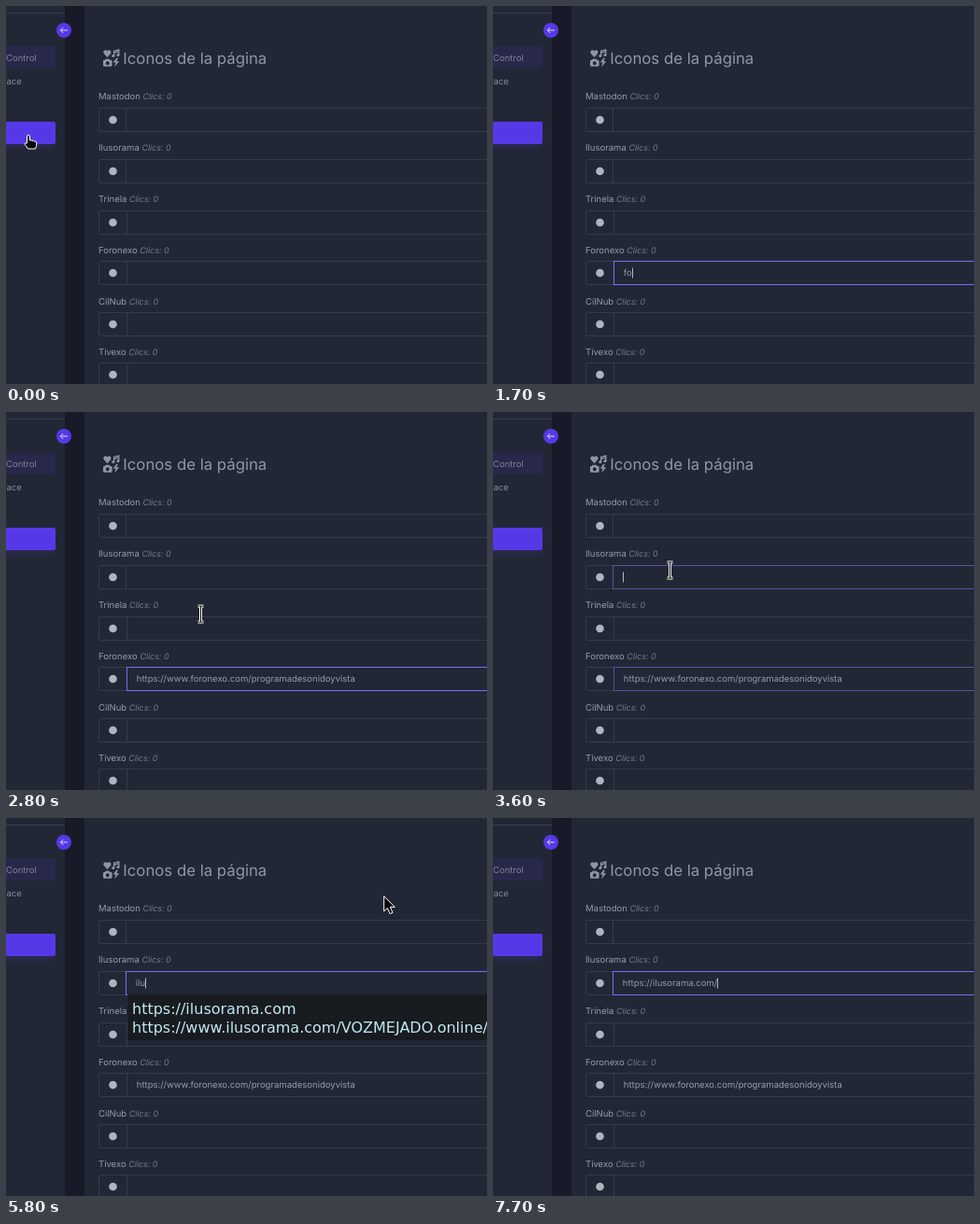
Write an HTML page that moves like this. It is 515 px wide and 405 px high and loops after 8000 ms.

```html
<!DOCTYPE html>
<html lang="es">
<head>
<meta charset="utf-8">
<title>Iconos de la página</title>
<style>
  html, body { margin: 0; width: 100%; height: 100%; overflow: hidden; background: #222736; }
  svg { display: block; }
  text { font: 9.5px Inter, sans-serif; fill: #979baa; white-space: pre; text-rendering: geometricPrecision; }
  .clicks { font-size: 8.9px; font-style: italic; fill: #767b8b; }
  .title { font-size: 16.75px; fill: #9195a4; }
  .popup text { font: 16px "DejaVu Sans", sans-serif; fill: #c3e7f3; text-rendering: auto; }
  .box { fill: none; stroke: #363b4b; }
  .focus { fill: none; stroke: #7b6cf0; }
</style>
</head>
<body>
<svg id="stage" width="515" height="405" viewBox="0 0 515 405">
  <defs>
    <filter id="glow" x="-20%" y="-50%" width="140%" height="220%"><feGaussianBlur stdDeviation="3"/></filter>
  </defs>
  <rect width="515" height="405" fill="#222736"/>
  <rect x="63" width="21" height="405" fill="#181a28"/>
  <path d="M0 7.5H63" stroke="#393e4e"/>
  <path d="M0 43H51a2 2 0 0 1 2 2V65a2 2 0 0 1-2 2H0Z" fill="#28284a"/>
  <text x="0" y="59" style="fill:#7e8295">Control</text>
  <text x="0.5" y="84" style="fill:#858a99">ace</text>
  <rect x="-10" y="127" width="61" height="24" fill="#5538df" opacity=".2" filter="url(#glow)"/>
  <path d="M0 124H51a2 2 0 0 1 2 2V146a2 2 0 0 1-2 2H0Z" fill="#5639e6"/>
  <circle cx="62" cy="26" r="8" fill="#5639e6"/>
  <path d="M66 26H58.5M61.3 23L58.3 26L61.3 29" fill="none" stroke="#dcd8fa"/>

  <g transform="translate(104 46.5) scale(1.03 1.05)" fill="#9195a4">
    <path d="M4.3 8L.8 4.4C-.6 2.4 1.8-.8 4.3 1.6C6.8-.8 9.2 2.4 7.8 4.4Z"/>
    <path d="M11.3 6.5V1.6L16.3.3V5.6M11.3 3.4L16.3 2.1" fill="none" stroke="#9195a4" stroke-width="1.3"/>
    <circle cx="10.5" cy="6.7" r="1.5"/><circle cx="15.5" cy="5.7" r="1.5"/>
    <path fill-rule="evenodd" d="M2.5 9.7H6.5L7.2 11H8.3Q9.3 11 9.3 12V16.3Q9.3 17.3 8.3 17.3H1Q0 17.3 0 16.3V12Q0 11 1 11H1.8ZM4.6 12.2a1.9 1.9 0 1 0 .1 0Z"/>
    <path d="M13.8 8.7L10.4 13.4H13L11.8 17.8L16.8 12.2H13.9L15.5 8.7Z"/>
  </g>
  <text class="title" x="125.3" y="62">Iconos de la página</text>
  <g id="fields"></g>
  <g id="popups"></g>
  <g id="mouse" stroke-linejoin="round">
    <path id="arrow" d="M.7.8V16.9L4.4 13.5L7.1 19.6L10 18.4L7.4 12.4H12.3Z" fill="#080808" stroke="#fff"/>
    <g id="beam" fill="none">
      <path d="M-3-8.5H3M0-8.5V8.5M-3 8.5H3" stroke="#fff" stroke-width="3"/>
      <path d="M-3-8.5H3M0-8.5V8.5M-3 8.5H3" stroke="#080808"/>
    </g>
    <path id="hand" d="M-1.5 9V1Q0-1 1.5 1V6Q3 5 4 6.5Q5.5 5.5 6.5 7Q8.5 6.5 8.7 8.5V11.5L7.5 15H-.5L-3.7 10.5Q-4.3 8 -1.5 9Z" fill="#080808" stroke="#fff"/>
  </g>
</svg>
<script>
const $ = id => document.getElementById(id);
const LOOP = 8000, STEP = 100;
const photo = 'https://ilusorama.com';
const forum = 'https://www.foronexo.com/programadesonidoyvista';
const names = ['Mastodon', 'Ilusorama', 'Trinela', 'Foronexo', 'CilNub', 'Tivexo'];

$('fields').innerHTML = names.map((name, i) => {
  const top = Math.round(i * 54.65 + .21) + 109.5, x = i < 2 ? 128.5 : 129.5;
  return `<text x="99" y="${100.3 + i * 54.8}">${name} <tspan class="clicks">Clics: 0</tspan></text>
    <path class="box" d="M520 ${top}H101.5q-2 0-2 2v21q0 2 2 2H520M${x} ${top}v25"/>
    <circle cx="114.5" cy="${top + 12.5}" r="4.3" fill="#b1b4c0"/>
    <rect class="focus" id="focus${i}" x="${x}" y="${top}" width="400" height="25"/>
    <text id="value${i}" x="${x + 10.3}" y="${top + 15.8}"></text>
    <rect id="caret${i}" y="${top + 7}" width="1" height="11" fill="#b4b7c3"/>`;
}).join('');

// a suggestion list hides the lower border of its field
const popup = (id, top, rows) => `<g class="popup" id="${id}">
  <rect x="130.5" y="${top}" width="390" height="${rows.length * 20 + 9}" fill="#181c20"/>
  <rect id="${id}Hover" x="130.5" y="${top + 5}" width="390" height="20" fill="#343b41"/>
  ${rows.map((row, i) => `<text x="135" y="${top + 21 + i * 20}">${row}</text>`).join('')}</g>`;
$('popups').innerHTML =
  popup('photoList', 189, [photo, 'https://www.ilusorama.com/VOZMEJADO.online/']) +
  popup('forumList', 298, [forum]);

// time, x, y, pointer shape
const path = [
  [0, 24, 138, 'hand'], [200, 60, 150, 'arrow'], [500, 180, 225, 'beam'],
  [900, 342, 295, 'beam'], [1000, 336, 290, 'beam'], [1300, 310, 287, 'beam'],
  [1500, 310, 287, ''], [2000, 215, 291.5, 'beam'], [2100, 215, 303, 'arrow'],
  [2200, 214, 313, 'arrow'], [2400, 214, 313, 'arrow'], [2500, 213, 290, 'beam'],
  [2800, 208.5, 216.5, 'beam'], [3000, 202, 150, 'beam'], [3100, 196, 128, 'beam'],
  [3200, 190, 127, 'arrow'], [3300, 189, 150, 'beam'], [3400, 189.5, 169.5, 'beam'],
  [4000, 189.5, 169.5, 'beam'], [4100, 188.5, 170.5, 'beam'], [4700, 188.5, 170.5, ''],
  [5200, 272.5, 63.5, 'beam'], [5300, 272.5, 63.5, ''], [5600, 352, 21, 'arrow'],
  [5800, 404, 83, 'arrow'], [6000, 396, 140, 'arrow'], [6200, 345, 200, 'arrow'],
  [6300, 338, 209, 'arrow'], [6400, 338, 206, 'arrow'], [7700, 338, 206, '']
];

const latest = (t, steps) => steps.reduce((now, [at, v]) => t >= at ? v : now, '');
const within = (t, a, b) => t >= a && t < b;
const show = (id, on) => $(id).setAttribute('visibility', on ? 'inherit' : 'hidden');

function pointer(t) {
  const n = path.findLastIndex(k => k[0] <= t), a = path[n], b = path[n + 1] || a;
  const p = b === a ? 0 : (t - a[0]) / (b[0] - a[0]);
  return { x: a[1] + (b[1] - a[1]) * p, y: a[2] + (b[2] - a[2]) * p, shape: a[3] };
}

// focus fades in and out over two steps
const fade = (t, a, b) => Math.max(0, t < a ? 0 : Math.min(1, (t - a + 100) / 200, (b + 100 - t) / 200));

function setField(i, value, focus, caret) {
  const text = $('value' + i);
  if (text.textContent !== value) text.textContent = value;
  $('focus' + i).setAttribute('opacity', focus);
  const end = +text.getAttribute('x') + (value ? text.getComputedTextLength() : 0);
  $('caret' + i).setAttribute('x', Math.round(end));
  show('caret' + i, caret);
}

function draw(now) {
  const t = Math.floor(Math.max(0, now - start) % LOOP / STEP) * STEP;
  const m = pointer(t);

  setField(3, latest(t, [[1600, 'f'], [1700, 'fo'], [2400, forum]]),
    fade(t, 1300, 3600),
    within(t, 1300, 2700) || within(t, 3200, 3600));
  setField(1, latest(t, [[4700, 'i'], [4800, 'il'], [4900, 'ilu'], [6500, photo], [7700, photo + '/']]),
    fade(t, 3600, LOOP + 200),
    within(t, 3600, 6200) || within(t, 6500, 7200) || t >= 7700);

  show('forumList', within(t, 1800, 2400));
  show('forumListHover', within(t, 2100, 2400));
  show('photoList', within(t, 4900, 6500));
  show('photoListHover', within(t, 6200, 6500));

  for (const shape of ['arrow', 'beam', 'hand']) show(shape, shape === m.shape);
  $('mouse').setAttribute('transform', `translate(${Math.round(m.x * 2) / 2} ${Math.round(m.y * 2) / 2})`);
  requestAnimationFrame(draw);
}

for (const i of [0, 2, 4, 5]) setField(i, '', 0, false);
const start = performance.now();
draw(start);
</script>
</body>
</html>
```
